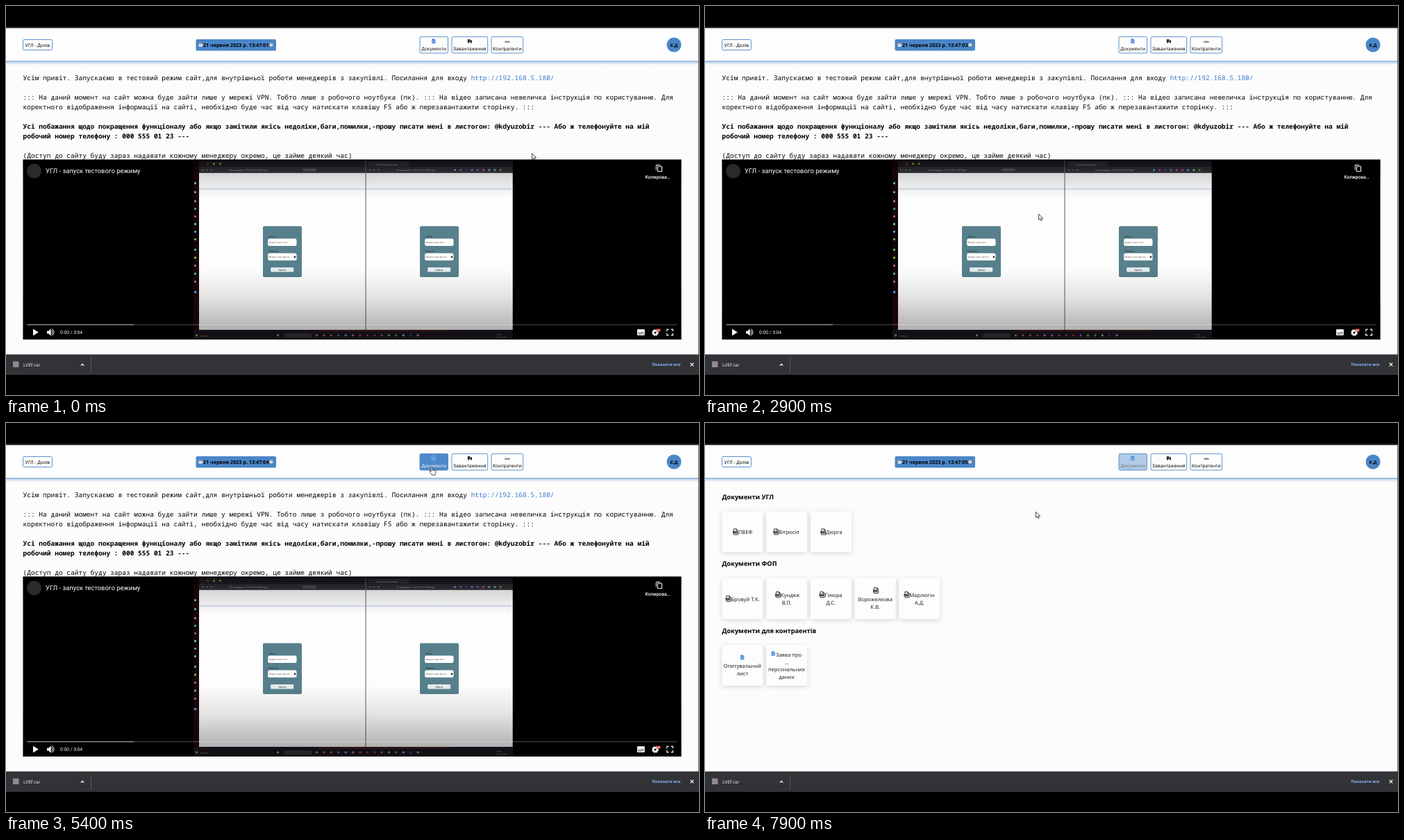
Recreate the animation shown at these times as an HTML page. Size 998 px wide and 561 px high, loop 8 s.

```html
<!DOCTYPE html>
<html lang="uk">
<head>
<meta charset="utf-8">
<style>
  html, body { margin: 0; width: 100%; height: 100%; overflow: hidden; background: #000; }
  svg { display: block; }
  text { font-family: "Noto Sans", sans-serif; text-rendering: geometricPrecision; white-space: pre; }
  .mono text { font: 9.52px "Noto Sans Mono", monospace; }
  .mono .bold { font-weight: 700; }
  .video text { font-family: Roboto, sans-serif; }
</style>
</head>
<body>
<svg id="stage" width="998" height="561" viewBox="0 0 998 561"></svg>
<script>
const LOOP = 8000, BLUE = '#4a86c8';

const rect = (x, y, w, h, fill, more = '') =>
  `<rect x="${x}" y="${y}" width="${w}" height="${h}" fill="${fill}" ${more}/>`;
const text = (x, y, size, str, more = '') =>
  `<text x="${x}" y="${y}" font-size="${size}" ${more}>${str}</text>`;
const path = (d, more = '') => `<path d="${d}" ${more}/>`;
const group = (more, ...parts) => `<g ${more}>${parts.join('')}</g>`;
const fade = (id, ...stops) => `<linearGradient id="${id}" x2="0" y2="1">` +
  stops.map(([at, color, alpha]) => `<stop offset="${at}" stop-color="${color}" stop-opacity="${alpha}"/>`).join('') +
  '</linearGradient>';
const MID = 'text-anchor="middle"';
const BOLD = 'font-weight="700"';

let seed = 7;
const random = () => (seed = seed * 16807 % 2147483647) / 2147483647;

const defs = '<defs>' +
  fade('glow', [0, BLUE, .75], [.35, BLUE, .3], [1, BLUE, 0]) +
  fade('top', [0, '#000', .55], [.35, '#000', .16], [1, '#000', 0]) +
  fade('bottom', [0, '#000', 0], [.4, '#000', .1], [1, '#000', .36]) +
  fade('side', [0, '#1c0508', 1], [.5, '#12060b', 1], [1, '#260509', 1]) +
  '<filter id="soft" x="-30%" y="-30%" width="160%" height="160%"><feGaussianBlur stdDeviation="3.5"/></filter></defs>';

// Small icons
const blueDoc = (x, y) => path(`M${x} ${y}h3.6l1.6 1.6v5h-5.2z`, 'fill="#4a8be0" stroke="#a9c8f2" stroke-width=".5"') +
  path(`M${x + 1.2} ${y + 3}h2.8m-2.8 1.5h2.8`, 'stroke="#dbe8fb" stroke-width=".5"');
const pdf = (x, y) =>
  path(`M${x + 1.4} ${y + 4}V${y + .5}h4l2 2v6.2h-6v-1.2M${x + 5.2} ${y + .5}v2.2h2.2`, 'fill="none" stroke="#222" stroke-width=".9"') +
  rect(x, y + 3.8, 6.4, 3.2, '#222') +
  path(`M${x + 1} ${y + 5.4}h4.4`, 'stroke="#fff" stroke-width=".8" stroke-dasharray="1.1 .6"');
const truck = path('M664.8 48h3.6v4.2h-3.6zM668.8 49h1.4l1 1.4v1.8h-2.4z', 'fill="#333"') +
  '<circle cx="666.2" cy="52.6" r=".9"/><circle cx="669.8" cy="52.6" r=".9"/>';
const partners = path('M718 51.4q2-2.2 4-1 2-1.2 4 1v1h-8z', 'fill="#b9aab0"') +
  path('M718.4 52.2h7.2', 'stroke="#6d5560" stroke-width=".8"');

const frame = (x, y, w, h) => rect(x, y, w, h, '#fdfdfd', `rx="2" stroke="${BLUE}" stroke-width=".9"`);

const header = group('',
  rect(0, 30, 998, 2.4, '#3b3335'),
  rect(0, 32, 998, 47.5, '#fdfdfd'),
  rect(0, 79, 998, 6, 'url(#glow)'),
  frame(24.5, 48.5, 42, 15), text(45.5, 58.7, 6.6, 'УГЛ - Долів', MID),
  rect(273.5, 48, 115.5, 16.5, BLUE, 'rx="2"'),
  rect(277.5, 53.2, 5.5, 5.6, '#d5dbe2', 'rx=".6"'), rect(277.5, 53.2, 5.5, 1.5, '#8d7f86'),
  text(284, 59, 7.2, '', `id="clock" ${BOLD}`),
  '<circle cx="382" cy="56" r="2.7" fill="#eef0f2" stroke="#6b7785" stroke-width=".7"/>',
  path('M382 54.4V56h1.2', 'fill="none" stroke="#444" stroke-width=".5"'),
  rect(596, 44.3, 40.5, 23.7, '#fdfdfd', `id="button" rx="2" stroke="${BLUE}" stroke-width=".9"`),
  blueDoc(613.3, 47.3), text(616.2, 63.8, 6.7, 'Документи', `id="label" ${MID}`),
  frame(642, 44.3, 51.7, 23.7), truck, text(667.8, 63.8, 6.7, 'Завантаження', MID),
  frame(699, 44.3, 45.7, 23.7), partners, text(721.9, 63.8, 6.7, 'Контрагенти', MID),
  `<circle cx="962" cy="56" r="10.5" fill="${BLUE}"/>`,
  text(962, 58.6, 6.4, 'К.Д', `${MID} ${BOLD}`));

const news = group('class="mono"',
  text(24.5, 106.5, 9.52, 'Усім привіт. Запускаємо в тестовий режим сайт,для внутрішньої роботи менеджерів з закупівлі. Посилання для входу <tspan fill="#3a7bd0" font-weight="500">http://192.168.5.180/</tspan>'),
  text(24.5, 134.7, 9.52, '::: На даний момент на сайт можна буде зайти лише у мережі VPN. Тобто лише з робочого ноутбука (пк). ::: На відео записана невеличка інструкція по користуванню. Для'),
  text(24.5, 148.7, 9.52, 'коректного відображення інформації на сайті, необхідно буде час від часу натискати клавішу F5 або ж перезавантажити сторінку. :::'),
  text(24.5, 176.7, 9.52, 'Усі побажання щодо покращення функціоналу або якщо замітили якісь недоліки,баги,помилки,-прошу писати мені в листогон: @kdyuzobir --- Або ж телефонуйте на мій', 'class="bold"'),
  text(24.5, 190.7, 9.52, 'робочий номер телефону : 000 555 01 23 ---', 'class="bold"'),
  text(24.5, 218.7, 9.52, '(Доступ до сайту буду зараз надавати кожному менеджеру окремо, це займе деякий час)'));

const login = x => group(`transform="translate(${x} 317.5)"`,
  rect(0, 0, 56, 73.5, '#57808c', 'rx="2"'),
  text(8, 16.5, 4, 'Логін', 'fill="#1d3037"'), rect(7.2, 18, 41.3, 10.5, '#fff', 'rx="2.5"'),
  text(8.6, 24.4, 3.2, 'Введіть ваш логін', 'fill="#555"'),
  text(8, 37.6, 4, 'Пароль', 'fill="#1d3037"'), rect(7.2, 39, 41.3, 10.5, '#fff', 'rx="2.5"'),
  text(8.6, 45.4, 3.2, 'Введіть ваш пароль', 'fill="#555"'),
  '<circle cx="46" cy="44.5" r="1.4" fill="#333"/>',
  rect(11.2, 59.5, 33, 6.5, '#e3ecef', 'rx="1"'), text(27.7, 64, 3.6, 'Увійти', `${MID} fill="#333"`));

const dots = (count, x, y, dx, dy) => Array.from({ length: count }, (_, i) =>
  rect(x + i * dx, y + i * dy, 3, 3, `hsl(${random() * 360} ${30 + random() * 30}% ${40 + random() * 25}%)`, 'rx="1"')).join('');

const windowBar = (x, w) => rect(x, 223, w, 9, '#25232a') + rect(x, 232, w, 8.8, '#34323a') +
  text(x + 43, 237.8, 3.6, 'Не захищено  192.168.5.180/login', 'fill="#aaa"') +
  path(`M${x + 4} 236.5h3m3 0h3m3 0h3`, 'stroke="#999" stroke-width=".9"');

const screen = group('',
  rect(270, 222, 460, 258.5, '#140d14'), rect(270, 222, 8, 258.5, 'url(#side)'),
  windowBar(278, 240), windowBar(519, 210.7),
  rect(427, 234.3, 20, 4, '#5a5860', 'rx="2"'),
  rect(522, 224.5, 58, 7, '#3a3840'), text(533, 229.5, 3.4, 'Сторінка для входу', 'fill="#bbb"'),
  dots(3, 289, 226, 9, 0), dots(9, 645, 235, 8.2, 0),
  rect(278, 240.8, 451.7, 226.5, '#fdfdfd'),
  rect(278, 263.4, 451.7, 1, '#a9c4e4'),
  rect(517.5, 223, 1.2, 244, '#77777b'),
  login(370), login(596),
  dots(3, 271, 254, 0, 13), dots(5, 271, 291, 0, 11), dots(5, 271, 350, 0, 11.5),
  rect(271, 411, 3.2, 3.2, '#4c9ee0'),
  rect(270, 467.2, 460, 13.3, '#1c1620'), rect(450, 467.2, 190, 2, '#4b2024'),
  dots(1, 273, 473.5, 8, 0), text(280, 476.5, 3.2, 'Хмарно', 'fill="#999"'),
  rect(400, 472, 40, 6.5, '#39343e', 'rx="3"'), dots(1, 390, 473.5, 8, 0), dots(15, 446, 473.5, 10.4, 0),
  text(706, 475, 3, '13:35', 'fill="#aaa"'), text(706, 478.8, 3, '21.06.2023', 'fill="#aaa"'));

const WHITE = 'fill="#fff"', LINE = 'fill="none" stroke="#fff"';
const video = group('class="video"',
  rect(24.5, 221.5, 948, 259.5, '#000'), screen,
  rect(24.5, 221.5, 948, 55, 'url(#top)'), rect(24.5, 378, 948, 103, 'url(#bottom)'),
  '<circle cx="40.5" cy="238" r="10.5" fill="#2a2a2a"/>',
  text(57, 241.3, 9.4, 'УГЛ - запуск тестового режиму', WHITE),
  path('M936.3 236.5v-7.2h6M938.5 231.3h6v7.4h-6z', `${LINE} stroke-width="1"`),
  text(938.5, 249.3, 6.8, 'Копирова…', `${WHITE} ${MID} font-weight="500"`),
  rect(30.5, 458.8, 936, 1.5, '#fff', 'opacity=".22"'), rect(30.5, 458.8, 153.5, 1.5, '#fff', 'opacity=".4"'),
  path('M39 465.8l7.8 4.8-7.8 4.8z', WHITE),
  path('M59 468.7h2.4l3.3-3.2v10.2l-3.3-3.2H59z', WHITE),
  path('M66 467.8q2.4 2.8 0 5.6M66.3 465.6q5.6 4.9 0 9.8', `${LINE} stroke-width="1"`),
  text(78, 473, 6.76, '0:00 / 3:04', WHITE),
  rect(909, 466.2, 10.8, 8.8, '#fff', 'rx="1"'),
  path('M910.5 471h1.8m1.2 0h4.8M910.5 473h4.8m1.2 0h1.8', 'stroke="#111" stroke-width=".9"'),
  '<circle cx="935" cy="471" r="2.8" fill="none" stroke="#fff" stroke-width="2.4"/>',
  '<circle cx="935" cy="471" r="4.3" fill="none" stroke="#fff" stroke-width="1.2" stroke-dasharray="2 1.38"/>',
  rect(936.4, 465.6, 6.2, 4, '#d9363a', 'rx=".8"'), text(939.5, 468.8, 3.2, 'HD', `${WHITE} ${MID} ${BOLD}`),
  path('M951.8 469.2v-2.8h2.8m3 0h2.8v2.8m0 2.8v2.8h-2.8m-3 0h-2.8V472', `${LINE} stroke-width="1.2"`));

const card = (col, y) => {
  const x = 24.5 + col * 63.75;
  return rect(x, y + 1.5, 59, 59, '#000', 'rx="3" opacity=".15" filter="url(#soft)"') + rect(x, y, 59, 59, '#fdfdfd', 'rx="3"');
};
const heading = (y, str) => text(24.5, y, 9.2, str, BOLD);
const entry = (x, y, str) => pdf(x, y - 8) + text(x + 8, y, 7.5, str);
const line = (x, y, str) => text(x, y, 7.5, str, MID);

const documents = group('fill="#222"',
  group('fill="#000"', heading(110.2, 'Документи УГЛ'), heading(206.4, 'Документи ФОП'), heading(302.9, 'Документи для контраентів')),
  [0, 1, 2].map(i => card(i, 127.5)).join(''),
  [0, 1, 2, 3, 4].map(i => card(i, 223.7)).join(''),
  [0, 1].map(i => card(i, 320)).join(''),
  entry(40, 160.3, 'ЛВЕФ'), entry(98.3, 160.3, 'Вітросіл'), entry(166.3, 160.3, 'Дюрга'),
  entry(29.5, 256.7, 'Бровуй Т.К.'),
  entry(101, 250.9, 'Кундяж'), line(117.7, 261.9, 'В.П.'),
  entry(164.5, 250.9, 'Гілюра'), line(181.3, 261.9, 'Д.С.'),
  pdf(242, 236.8), line(245.2, 256.7, 'Ворожелкова'), line(245.2, 267.5, 'К.В.'),
  entry(286.5, 250.9, 'Марлюгін'), line(309, 261.9, 'А.Д.'),
  blueDoc(51, 334.6), line(53.8, 352.8, 'Опитувальний'), line(53.8, 363.6, 'лист'),
  blueDoc(95.6, 329.2), text(102, 336.6, 7.5, 'Заява про'),
  line(117.6, 347.6, '...'), line(117.6, 358.4, 'персональних'), line(117.6, 369.2, 'даних'));

const downloads = group('',
  rect(0, 502.5, 998, 29.5, '#323337'),
  rect(10, 512.5, 8.5, 8.5, '#94868f'),
  text(25, 519.8, 6.5, 'LVEF.rar', 'fill="#f1f1f1"'),
  path('M107.8 518.6l2.3-2.3 2.3 2.3', `${LINE} stroke-width="1.1"`),
  rect(122, 507, .9, 22, '#5a5b5f'),
  text(950.8, 519.2, 5.9, 'Показати все', `${MID} fill="#8ab4f8" font-weight="600"`),
  path('M985.6 514.7l4.6 4.6m0-4.6l-4.6 4.6', `${LINE} stroke-width="1.2"`));

const CURSOR = 'fill="#fff" stroke="#111" stroke-width=".75" stroke-linejoin="round"';
const $ = id => document.getElementById(id);

$('stage').innerHTML = defs +
  rect(0, 32, 998, 471, '#fcfcfc') + header +
  group('id="news"', news, video) + group('id="documents"', documents) +
  downloads + rect(997.2, 32, .8, 471, '#444') +
  path('M0 0V8.6L2 6.7 3.3 9.7 4.7 9.1 3.4 6.2H6.1Z', `id="arrow" ${CURSOR}`) +
  path('M-1 1.2q0-1 1-1t1 1V4.2l4 .9q1 .3 .9 1.3l-.3 2.4q-.2 1-.7 1.5v1H.4q-.3-1-1.3-2L-2.9 6.6q-.4-.8.2-1.1.7-.2 1.7.8z', `id="hand" ${CURSOR}`);

// Pointer stops: time, x, y
const stops = [
  [0, 757.5, 212.5], [1800, 757.5, 212.5], [1900, 745.3, 204], [2200, 700, 154], [2400, 700, 154],
  [3100, 393.5, 358], [3300, 393.5, 358], [3800, 580.5, 84], [4050, 580.5, 84],
  [4600, 612.5, 64.5], [4900, 612.5, 64.5], [5700, 613.5, 63.2], [7400, 613.5, 63.2], [7900, 476.5, 128], [LOOP, 476.5, 128]
];
function pointerAt(t) {
  const i = stops.findIndex(s => s[0] > t);
  const [t0, x0, y0] = stops[i - 1], [t1, x1, y1] = stops[i];
  const k = (t - t0) / (t1 - t0);
  return [x0 + (x1 - x0) * k, y0 + (y1 - y0) * k];
}

function hoverAt(t) {
  if (t < 4300) return 0;
  return t < 7600 ? 1 - Math.exp((4300 - t) / 300) : Math.exp((7600 - t) / 350);
}
const mix = (a, b, k) => `rgb(${a.map((v, i) => Math.round(v + (b[i] - v) * k))})`;
const show = (id, on) => $(id).setAttribute('visibility', on ? 'visible' : 'hidden');

function draw() {
  const t = performance.now() % LOOP;
  const opened = t >= 6690;
  show('news', !opened);
  show('documents', opened);

  $('clock').textContent = '21 червня 2023 р. 13:47:0' + (1 + Math.floor((t + 1430) / 2030));

  const hover = hoverAt(t);
  $('button').setAttribute('fill', mix([253, 253, 253], [74, 134, 200], hover));
  $('label').setAttribute('fill', mix([20, 20, 20], [255, 255, 255], hover));

  const [x, y] = pointerAt(t);
  const over = x > 596 && x < 637 && y > 44 && y < 68;
  show('arrow', !over);
  show('hand', over);
  for (const id of ['arrow', 'hand']) $(id).setAttribute('transform', `translate(${x} ${y})`);
  requestAnimationFrame(draw);
}
draw();
</script>
</body>
</html>
```
